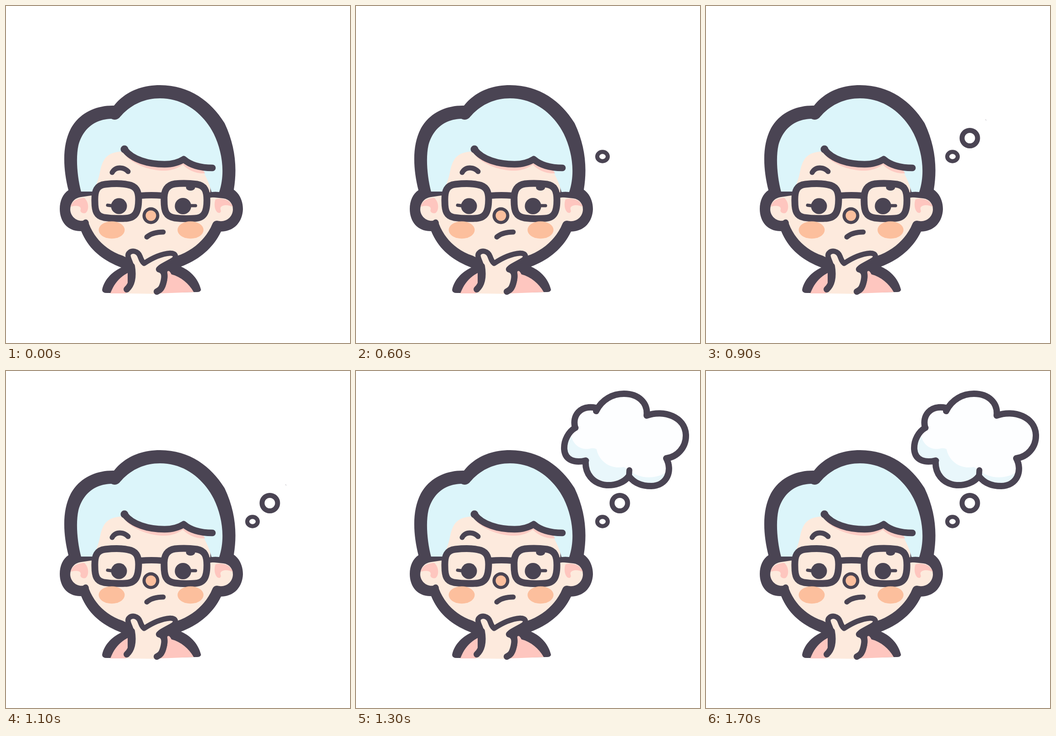
Write an HTML page that moves like this. It is 755 px wide and 741 px high and loops after 1.8 s.

```html
<!DOCTYPE html>
<html lang="en">
<head>
<meta charset="utf-8">
<title>Thinking</title>
<style>
  html, body { margin: 0; width: 100%; height: 100%; overflow: hidden; background: #fff; }
  svg { display: block; width: 755px; height: 741px; }
  .ink { fill: #4a4453; }
  .line { fill: none; stroke: #4a4453; stroke-linecap: round; stroke-linejoin: round; }
  .hair { fill: #dcf5fa; }
  .skin { fill: #fdeadd; }
  .pink { fill: #fec6bf; }
  .blush { fill: #fcbf9d; }
  .shade { fill: #e9f7fb; }
  [data-from] { visibility: hidden; }
</style>
</head>
<body>
<svg viewBox="0 0 755 741">
  <defs>
    <path id="puff" d="M527 88 C540 62 564 50 588 50 C620 50 641 70 638 98
      C676 84 722 101 724 140 C725 168 705 189 681 192
      C695 218 684 252 648 253 C625 253 609 245 599 231
      C588 246 568 252 550 251 C519 248 502 225 504 197
      C484 202 459 199 457 172 C456 152 467 133 481 125
      C474 99 491 74 527 81 Z"/>
    <clipPath id="inside"><use href="#puff"/></clipPath>
  </defs>

  <!-- silhouette -->
  <path class="ink" d="M237 219 C260 190 295 174 338 174 C405 174 452 212 480 258
    C503 307 508 355 500 404 C513 413 520 429 520 447 C519 474 502 495 472 496
    C456 530 425 558 384 573 C407 583 423 602 428 624 Q427 629 419 629
    L224 631 Q211 632 211 624 C215 604 230 586 253 575
    C212 559 182 536 165 495 C136 496 118 475 118 446 C118 428 125 413 137 405
    C125 357 123 307 142 270 C160 236 197 218 237 219 Z"/>

  <!-- ears and face -->
  <path class="skin" d="M192 416 L165 420 C149 422 141 434 141 448 C142 464 156 474 169 472
    Q173 468 178 470 Q182 473 182 479 C194 510 219 537 256 549 L302 572 L374 550
    C411 538 440 511 453 479 Q456 472 463 472 C482 477 497 465 498 448
    C498 435 491 425 477 423 L448 420 L450 360 L390 320 L200 300 Z"/>
  <path class="pink" d="M142 441 C144 431 155 422 172 422 C182 431 183 448 175 455
    C168 458 161 452 164 447 C165 439 154 438 142 441 Z"/>
  <path class="pink" d="M460 425 C476 421 493 426 498 442 C487 436 475 437 471 443
    C469 448 475 451 469 455 C459 456 455 436 460 425 Z"/>

  <!-- hair -->
  <path class="hair" d="M165 409 C156 375 153 333 159 306 C168 272 193 249 231 248
    Q243 254 252 242 C275 216 305 203 338 203 C393 203 434 238 456 281
    C474 318 482 366 468 409 L451 409 Q446 386 429 358 L390 337
    C355 359 292 348 255 320 C223 321 213 335 207 361 C203 382 198 394 190 409 Z"/>
  <path class="pink" d="M256 321 C276 350 320 363 350 362 C368 361 379 355 388 349
    C400 361 416 369 437 368 L428 353 L390 335 L345 346 Z" opacity=".85"/>
  <path class="hair" d="M260 315 C277 338 313 348 348 348 C367 348 379 344 390 337
    C405 350 425 356 453 356 L440 300 L270 290 Z"/>
  <path class="line" stroke-width="14.500" d="M260 315 C277 338 313 348 348 348
    C367 348 379 344 390 337 C405 350 425 356 453 356"/>
  <circle class="ink" cx="260" cy="315" r="8.5"/>

  <!-- glasses -->
  <g class="line">
    <path stroke-width="15" d="M195 430 C194 405 200 394 218 392 C237 390 255 390 268 393
      C285 396 291 406 291 425 C291 455 283 467 260 467 C242 468 228 467 215 465
      C199 462 195 451 195 430 Z"/>
    <path stroke-width="15" d="M347 428 C346 407 352 394 371 391 C388 389 405 390 419 392
      C436 395 441 406 441 427 C441 455 434 466 414 467 C400 468 384 468 370 466
      C351 463 347 451 347 428 Z"/>
    <path stroke-width="14" d="M295 417 Q319 415 343 417"/>
    <path stroke-width="8" d="M164 412 H190"/>
    <path stroke-width="12" d="M446 416 Q459 413 474 416"/>
    <path stroke-width="7" d="M223 438 L238 440 M400 439 H416"/>
    <path stroke-width="11" d="M309 508 C317 501 330 497 345 497"/>
    <path stroke-width="11" d="M233 366 C241 352 258 354 268 364"/>
  </g>
  <ellipse class="ink" cx="405" cy="399" rx="10" ry="7"/>
  <circle class="ink" cx="248" cy="440" r="17.5"/>
  <circle class="ink" cx="388.500" cy="440" r="18"/>
  <circle class="ink" cx="318" cy="461" r="18.500"/>
  <circle class="blush" cx="318" cy="461" r="11.500"/>
  <ellipse class="blush" cx="232" cy="492.500" rx="28.500" ry="19"/>
  <ellipse class="blush" cx="405" cy="492.500" rx="28.500" ry="19"/>

  <!-- shirt and hand -->
  <path class="pink" d="M229 632 C237 610 250 596 267 587 L267 632 Z"/>
  <path class="pink" d="M354 584 Q358 579 363 590 C385 596 401 610 412 629 L338 632
    C352 618 356 602 354 584 Z"/>
  <path class="skin" d="M264 632 C277 612 281 598 276 575 C274 560 264 552 269 544
    C276 536 290 539 294 550 L303 566 C318 556 340 545 360 543
    C375 543 376 554 366 559 C352 566 338 572 335 578
    C350 583 350 595 346 610 L331 633 Z"/>
  <path class="line" stroke-width="11.500" d="M277 580 C275 562 264 552 269 544
    C276 535 290 539 294 550 C297 558 299 563 303 566
    C318 556 340 545 360 543.500 C375 543 374 554 366 559 C352 567 338 573 335 579"/>
  <path class="line" stroke-width="14" d="M276 572 C280 595 276 613 265 623"/>
  <path class="line" stroke-width="14" d="M336 579 C350 582 349 596 345 610 C341 624 336 625 331 628"/>

  <!-- thought -->
  <ellipse class="line" data-from="400" cx="541" cy="331" rx="11.500" ry="10.200" stroke-width="9"/>
  <circle class="line" data-from="900" cx="579" cy="290.500" r="17" stroke-width="11"/>
  <path class="line" data-from="900" data-to="1300" d="M613.500 250 L615 251" stroke-width="1" opacity=".5"/>
  <g data-from="1300">
    <use href="#puff" fill="#fdfeff"/>
    <g clip-path="url(#inside)">
      <path class="shade" d="M473 145 C478 164 495 174 512 171 Q522 168 528 172
        C533 198 558 217 588 211 L599 218 L599 260 L440 260 L440 145 Z"/>
      <path class="shade" d="M599 217 C620 239 664 240 690 216 L690 260 L599 260 Z"/>
    </g>
    <use href="#puff" class="line" stroke-width="14"/>
    <path class="line" stroke-width="13" d="M599 234 L600 218 M527 82 V87 M638 97 H639 M681 192 H682 M504 197 H505 M481 125 H482"/>
  </g>
</svg>
<script>
  const LOOP = 1800;
  const parts = [...document.querySelectorAll('[data-from]')].map(el => ({
    el, from: +el.dataset.from, to: +(el.dataset.to || LOOP)
  }));
  const start = performance.now();

  function draw(now) {
    const t = Math.max(0, now - start) % LOOP;
    for (const { el, from, to } of parts) {
      el.style.visibility = t >= from && t < to ? 'visible' : 'hidden';
    }
    requestAnimationFrame(draw);
  }
  draw(start);
</script>
</body>
</html>
```
